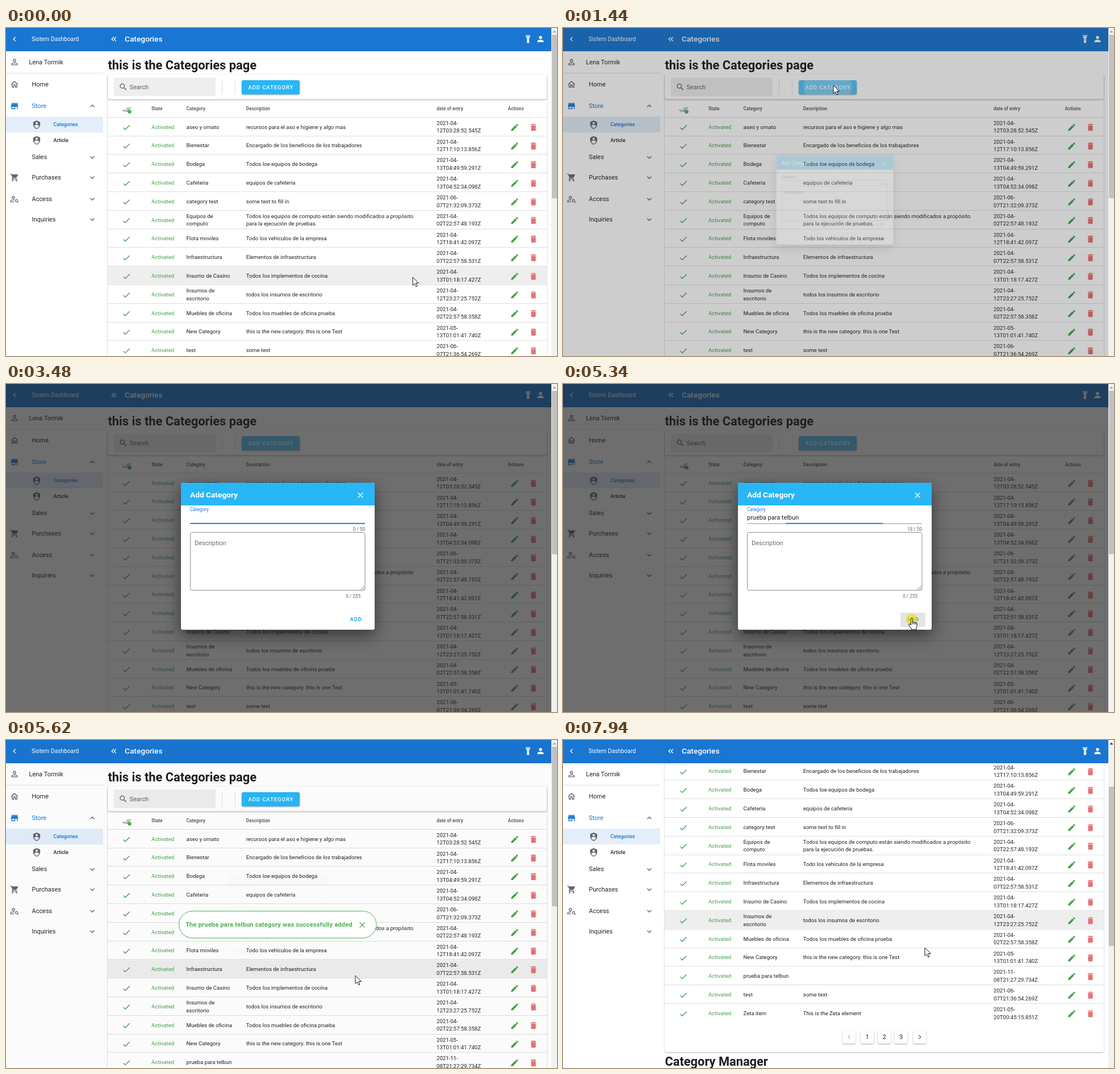
Recreate the animation shown at these times as an HTML page. Size 970 by 578 pixels, loop 8 s.

```html
<!DOCTYPE html>
<html lang="en">
<head>
<meta charset="utf-8">
<title>Categories</title>
<style>
html, body { margin: 0; width: 100%; height: 100%; overflow: hidden; background: #fff; }
svg { display: block; width: 970px; height: 578px; font-family: Roboto, sans-serif; }
text { white-space: pre; }
path { fill-rule: evenodd; }
.card { filter: drop-shadow(0 1px 1px rgba(0,0,0,.3)); }
.bar { filter: drop-shadow(0 1px 1px rgba(0,0,0,.35)); }
.panel { filter: drop-shadow(0 10px 14px rgba(0,0,0,.5)); }
.chip { filter: drop-shadow(0 1px 1px rgba(0,0,0,.35)); }
#modal { transform-origin: 478.5px 303.5px; }
#toast { transform-origin: 478px 325px; }
#line { transform-origin: 478px 246px; }
#ripple { transform-origin: 466px 104px; }
</style>
</head>
<body>
<svg id="stage" viewBox="0 0 970 578"></svg>
<script>
const LOOP = 8000, PITCH = 32.8, TOP = 157.8;
const BLUE = '#1976d2', SKY = '#29b6f6', GREEN = '#43a047', DARK = 'rgba(0,0,0,.87)', GREY = 'rgba(0,0,0,.6)';
const ENTRY = 'prueba para telbun';

const ICONS = {
  left: 'M15.4 16.6 10.8 12l4.6-4.6L14 6l-6 6 6 6Z',
  right: 'M8.6 16.6 13.2 12 8.6 7.4 10 6l6 6-6 6Z',
  down: 'M7.4 8.6 12 13.2l4.6-4.6L18 10l-6 6-6-6Z',
  up: 'M7.4 15.4 12 10.8l4.6 4.6L18 14l-6-6-6 6Z',
  first: 'M18.4 7.4 17 6l-6 6 6 6 1.4-1.4L13.8 12ZM12.4 7.4 11 6l-6 6 6 6 1.4-1.4L7.8 12Z',
  check: 'M21 7 9 19l-5.5-5.5 1.4-1.4L9 16.2 19.6 5.6Z',
  checks: 'M.4 13.4 6 19l1.4-1.4L1.8 12ZM22.2 5.6 11.7 16.2 7.5 12l-1.4 1.4 5.6 5.6 12-12ZM18 7l-1.4-1.4-6.4 6.3 1.5 1.4Z',
  pencil: 'M20.7 7c.4-.4.4-1 0-1.4l-2.3-2.3c-.4-.4-1-.4-1.4 0l-1.9 1.8 3.8 3.8ZM3 17.2V21h3.8L17.8 9.9l-3.7-3.7Z',
  bin: 'M19 4h-3.5l-1-1h-5l-1 1H5v2h14ZM6 19a2 2 0 0 0 2 2h8a2 2 0 0 0 2-2V7H6Z',
  close: 'M19 6.4 17.6 5 12 10.6 6.4 5 5 6.4l5.6 5.6L5 17.6 6.4 19l5.6-5.6 5.6 5.6 1.4-1.4-5.6-5.6Z',
  search: 'M9.5 3a6.5 6.5 0 0 1 4.9 10.7l.3.3h.8l5 5-1.5 1.5-5-5v-.8l-.3-.3A6.5 6.5 0 1 1 9.5 3Zm0 2a4.5 4.5 0 1 0 0 9 4.5 4.5 0 0 0 0-9Z',
  torch: 'M9 10 6 5h12l-3 5ZM18 4H6V2h12ZM9 22V11h6v11Zm3-9a1 1 0 1 0 0 2 1 1 0 0 0 0-2Z',
  person: 'M12 4a4 4 0 1 1 0 8 4 4 0 0 1 0-8Zm0 10c4.4 0 8 1.8 8 4v2H4v-2c0-2.2 3.6-4 8-4Z',
  user: 'M12 4a4 4 0 1 1 0 8 4 4 0 0 1 0-8Zm0 2a2 2 0 1 0 0 4 2 2 0 0 0 0-4Zm0 7c2.7 0 8 1.3 8 4v3H4v-3c0-2.7 5.3-4 8-4Zm0 1.9c-3 0-6.1 1.5-6.1 2.1v1.1h12.2V17c0-.6-3.1-2.1-6.1-2.1Z',
  home: 'M12 5.7l5 4.5V18h-2v-6H9v6H7v-7.8ZM12 3 2 12h3v8h6v-6h2v6h6v-8h3Z',
  store: 'M12 18H6v-4h6Zm9-4v-2l-1-5H4l-1 5v2h1v6h10v-6h4v6h2v-6ZM20 4H4v2h16Z',
  shield: 'M12 1 3 5v6c0 5.6 3.8 10.7 9 12 5.2-1.3 9-6.4 9-12V5Zm0 4a3 3 0 1 1 0 6 3 3 0 0 1 0-6Zm5.1 12a9.6 9.6 0 0 1-5.1 3.9A9.6 9.6 0 0 1 6 15.5c0-1.7 2.7-3 6-3s6 1.3 6 3Z',
  cart: 'M17 18a2 2 0 1 1 0 4 2 2 0 0 1 0-4ZM1 2h3.3l.9 2H20a1 1 0 0 1 .9 1.5L17.3 12a2 2 0 0 1-1.8 1H8.1l-.9 1.6.2.4H19v2H7a2 2 0 0 1-1.8-3l1.4-2.4L3 4H1ZM7 18a2 2 0 1 1 0 4 2 2 0 0 1 0-4Z',
  lookup: 'M9 4a4 4 0 1 1 0 8 4 4 0 0 1 0-8Zm0 2a2 2 0 1 0 0 4 2 2 0 0 0 0-4ZM9 13c-2.7 0-8 1.3-8 4v3h10v-1.9H2.9V17c0-.6 3.1-2.1 6.1-2.1h1.5L11.5 13ZM17 12a4 4 0 0 1 3.4 6.1l3 3-1.3 1.3-3-3A4 4 0 1 1 17 12Zm0 1.8a2.2 2.2 0 1 0 0 4.4 2.2 2.2 0 0 0 0-4.4Z'
};

const text = (x, cy, s, size = 9.6, fill = DARK, extra = '') =>
  `<text x="${x}" y="${cy + size * .36}" font-size="${size}" fill="${fill}" ${extra}>${s}</text>`;
const rect = (x, y, w, h, fill, extra = '') =>
  `<rect x="${x}" y="${y}" width="${w}" height="${h}" fill="${fill}" ${extra}/>`;
const icon = (name, cx, cy, fill = GREY, size = 16.4) =>
  `<path transform="translate(${cx - size / 2} ${cy - size / 2}) scale(${size / 24})" d="${ICONS[name]}" fill="${fill}"/>`;
const group = (id, body) => `<g id="${id}">${body}</g>`;
const BOLD = 'font-weight="700"', MEDIUM = 'font-weight="500"';
const CAPS = MEDIUM + ' letter-spacing=".86"';
const RIGHT = 'text-anchor="end"', MIDDLE = 'text-anchor="middle"';

// Category, description, date of entry; "|" breaks a line.
const ROWS = [
  ['aseo y ornato', 'recursos para el aso e higiene y algo mas', '2021-04-|12T03:28:52.545Z'],
  ['Bienestar', 'Encargado de los beneficios de los trabajadores', '2021-04-|12T17:10:13.856Z'],
  ['Bodega', 'Todos loe equipos de bodega', '2021-04-|13T04:49:59.291Z'],
  ['Cafeteria', 'equipos de cafeteria', '2021-04-|13T04:52:34.098Z'],
  ['category test', 'some text to fill in', '2021-06-|07T21:32:09.373Z'],
  ['Equipos de|computo', 'Todos los equipos de computo están siendo modificados a propósito|para la ejecución de pruebas.', '2021-04-|02T22:57:48.193Z'],
  ['Flota moviles', 'Todo los vehículos de la empresa', '2021-04-|12T18:41:42.097Z'],
  ['Infraestructura', 'Elementos de infraestructura', '2021-04-|07T22:57:58.531Z'],
  ['Insumo de Casino', 'Todos los implementos de cocina', '2021-04-|13T01:18:17.427Z'],
  ['Insumos de|escritorio', 'todos los insumos de escritorio', '2021-04-|12T23:27:25.752Z'],
  ['Muebles de oficina', 'Todos los muebles de oficina prueba', '2021-04-|02T22:57:58.358Z'],
  ['New Category', 'this is the new category. this is one Test', '2021-05-|13T01:01:41.740Z'],
  [ENTRY, '', '2021-11-|08T21:27:29.734Z'],
  ['test', 'some text', '2021-06-|07T21:36:54.269Z'],
  ['Zeta item', 'This is the Zeta element', '2021-05-|20T00:45:15.851Z']
];
const cell = (x, cy, s) => {
  const lines = s.split('|');
  return lines.map((l, i) => text(x, cy + (i - (lines.length - 1) / 2) * 13.6, l)).join('');
};
const row = (cells, i) => {
  const cy = TOP + PITCH * (i + .5);
  return icon('check', 212, cy + 1, GREEN) + text(256, cy, 'Activated', 9.6, GREEN)
    + cells.map((s, c) => cell([317.5, 422.7, 758][c], cy, s)).join('')
    + icon('pencil', 895.5, cy + 1, GREEN) + icon('bin', 928.5, cy + 1, '#e57373')
    + (i < ROWS.length - 1 ? rect(179, Math.round(TOP + PITCH * (i + 1)) - 1, 773, 1, '#dedede') : '');
};

const chip = (x, label) => rect(x, 664, 23, 23, '#fff', 'rx="3" class="chip"') + label;
const pager = chip(492, icon('left', 503.5, 675.5, '#bbb')) + chip(524, text(535.5, 675.5, 1, 11, DARK, MIDDLE))
  + chip(554, text(565.5, 675.5, 2, 11, DARK, MIDDLE)) + chip(583.5, text(595, 675.5, 3, 11, DARK, MIDDLE))
  + chip(616.5, icon('right', 628, 675.5));

const heads = [[256, 'State'], [317.5, 'Category'], [422.7, 'Description'], [758, 'date of entry'], [883.5, 'Actions']];
const page = text(179.5, 65.5, 'this is the Categories page', 21.8, '#1d1d1d', BOLD)
  + rect(179, 82, 773, 620, '#fff', 'rx="3" class="card"')
  + rect(179, 82, 773, 43.5, '#fff', 'rx="3" class="bar"')
  + rect(190, 87.5, 179, 32.5, '#eee', 'rx="3"') + icon('search', 206.5, 104)
  + text(217.5, 104, 'Search', 10.96, GREY)
  + rect(380, 91, 1, 26, '#dedede') + rect(403, 91, 1, 26, '#dedede')
  + rect(415, 92, 102, 25, SKY, 'rx="3" class="chip"')
  + rect(415, 92, 102, 25, '#fff', 'id="focus" rx="3" opacity="0"')
  + '<g clip-path="url(#button)"><circle id="ripple" cx="466" cy="104" r="52" fill="#fff" opacity="0"/></g>'
  + text(426.5, 104.5, 'ADD CATEGORY', 9.6, '#fff', CAPS)
  + icon('checks', 212.5, 143.5, '#7d917d') + '<circle cx="217.5" cy="147.5" r="3.3" fill="#4caf50"/>'
  + heads.map(([x, s]) => text(x, 142, s, 8.2, GREY, BOLD)).join('')
  + rect(179, 157, 773, 1, '#dedede')
  + rect(179, TOP, 773, PITCH - 1, '#eee', 'id="hover"')
  + ROWS.slice(0, 12).map(row).join('')
  + group('fresh', row(ROWS[12], 12))
  + group('tail', row(ROWS[13], 13) + row(ROWS[14], 14) + pager)
  + text(179.5, 718, 'Category Manager', 21.8, '#1d1d1d', BOLD);

const menu = [['Home', 99, 'home'], ['Store', 137, 'store', 'up'], ['Sales', 227.5, '', 'down'],
  ['Purchases', 263, 'cart', 'down'], ['Access', 301, 'lookup', 'down'], ['Inquiries', 337, '', 'down']];
const sidebar = rect(0, 41, 171, 537, '#fff') + icon('user', 15, 60) + text(40.5, 60, 'Lena Tormik', 10.96)
  + rect(0, 79, 171, 1, '#dedede') + rect(0, 156, 171, 28, '#e3eefa')
  + menu.map(([s, y, sign, arrow]) => {
    const tint = s === 'Store' ? BLUE : undefined;
    return text(45.5, y, s, 10.96, tint) + (sign ? icon(sign, 15, y + .5, tint) : '')
      + (arrow ? icon(arrow, 152, y + .5) : '');
  }).join('')
  + icon('shield', 54, 170.5, '#666') + text(83.5, 170, 'Categories', 8.9, BLUE, MEDIUM)
  + icon('shield', 54, 198, '#666') + text(83.5, 197.5, 'Article', 8.9, DARK, MEDIUM);

const toolbar = rect(0, 0, 960, 41, BLUE) + icon('left', 15, 19.5, '#fff')
  + text(45, 19.5, 'Sistem Dashboard', 10.2, '#fff') + icon('first', 190, 19.5, '#fff')
  + text(209, 19.5, 'Categories', 13.7, '#fff', MEDIUM)
  + icon('torch', 919, 19.5, '#fff') + icon('person', 941, 19.5, '#fff');

const steps = [...Array(ENTRY.length + 1).keys()];
const modal = rect(308, 174, 341, 259, '#fff', 'rx="3" class="panel"')
  + `<path d="M308 214V177a3 3 0 0 1 3-3H646a3 3 0 0 1 3 3V214Z" fill="${SKY}"/>`
  + text(324, 195.5, 'Add Category', 13.7, '#fff', BOLD) + icon('close', 624, 196, '#fff')
  + group('label', text(0, -3.95, 'Category', 10.96, 'inherit'))
  + rect(324, 245.5, 308, 1, '#8c8c8c') + rect(324, 244.8, 308, 1.7, BLUE, 'id="line"')
  + steps.map(k => group('typed' + k, text(324, 235, ENTRY.slice(0, k), 10.96)
    + text(632, 256.5, k + ' / 50', 8.2, GREY, RIGHT))).join('')
  + rect(0, 228, 1, 14, '#000', 'id="caret"')
  + rect(324.5, 261.5, 307.5, 102, 'none', 'rx="3" stroke="#8c8c8c"')
  + '<path d="M624 362.5l7-7M628 362.5l3-3" stroke="#555" stroke-width=".9"/>'
  + text(332, 280.5, 'Description', 10.96, GREY) + text(624, 374, '0 / 255', 8.2, GREY, RIGHT)
  + rect(594, 403, 44, 25, '#e4e4e4', 'id="pressed" rx="3"') + text(605.5, 415, 'ADD', 9.6, '#039be5', CAPS);

const toast = rect(304.5, 301.5, 347.5, 47.5, '#fff', 'rx="23.7" stroke="#4caf50"')
  + text(316, 325, `The ${ENTRY} category was successfully added`, 10.96, '#4caf50', BOLD + ' letter-spacing=".26"')
  + icon('close', 627, 326, '#4caf50');

const cursor = '<circle id="click" cy="2" r="10" fill="#f0e000" opacity="0"/>'
  + '<path id="arrow" d="M0 0V14.5L3.4 11.4 5.8 16.8 8 15.8 5.7 10.5H10.4Z" fill="#fff" stroke="#000" stroke-width=".9"/>'
  + '<path id="hand" d="M-1.4 11V1.2a1.4 1.4 0 0 1 2.8 0V6.8q1.3-1 2.7.3 1.4-.8 2.6.5 2-.4 2.3 1.5v4.4q-.2 2.5-1.5 4.2v2.3H-.3v-1.7L-4.6 12.8q-1.6-2.3.2-2.9 1-.3 3 2ZM1.4 7v3.5M4.1 7.3v3.2M6.7 7.8v2.7" fill="#fff" stroke="#000"/>'
  + '<path id="beam" d="M-3-6.5h2.2L0-6l.8-.5H3M0-6V6M-3 6.5h2.2L0 6l.8.5H3" fill="none" stroke="#222"/>';

document.getElementById('stage').innerHTML =
  '<clipPath id="button"><rect x="415" y="92" width="102" height="25" rx="3"/></clipPath>'
  + rect(0, 0, 970, 578, '#fff') + group('scroll', page) + sidebar + toolbar
  + rect(0, 0, 960, 578, '#212121', 'id="shade"') + group('modal', modal) + group('toast', toast)
  + rect(960, 0, 10, 578, '#f1f1f1') + '<path id="nub" d="M962.5 8 965.5 4.5 968.5 8Z"/>'
  + rect(961, 12, 9, 288, '#c1c1c1', 'id="thumb"') + group('cursor', cursor);

const $ = id => document.getElementById(id);
const HOLD = 'step-end', SWIFT = 'cubic-bezier(.25,.8,.5,1)';

// Keys are [time, value, easing towards the next key].
function track(id, prop, keys, easing = 'linear') {
  const frames = keys.map(([t, v, e = easing]) => ({ offset: t / LOOP, [prop]: v, easing: e }));
  if (frames[0].offset > 0) frames.unshift({ ...frames[0], offset: 0, easing: HOLD });
  if (frames.at(-1).offset < 1) frames.push({ ...frames.at(-1), offset: 1 });
  $(id).animate(frames, { duration: LOOP, iterations: Infinity });
}
const show = (id, ...times) =>
  track(id, 'opacity', [[0, 0], ...times.map((t, i) => [t, i % 2 ? 0 : 1])], HOLD);
const at = (x, y) => `translate(${x}px,${y}px)`;

// Pointer
track('cursor', 'transform', [
  [0, 716, 439], [80, 716, 439], [150, 703, 421], [480, 703, 421], [1240, 476, 101], [1870, 476, 101],
  [2060, 470, 150], [2400, 404, 240], [2540, 404, 244], [4450, 404, 244], [4590, 540, 430], [5010, 616, 434],
  [5339, 616, 434], [5340, 614, 413], [5480, 614, 413], [5550, 615, 415], [6080, 615, 415], [6780, 628, 327],
  [7260, 628, 327], [7470, 637, 366]
].map(([t, x, y]) => [t, at(x, y)]));
show('arrow', 0, 2380, 4450, 5340, 5500, 6700, 7380);
show('beam', 2380, 3480);
show('hand', 5340, 5500, 6700, 7380);
show('click');
track('click', 'opacity', [[0, 0], [1290, .65], [1400, 0], [2540, .65], [2650, 0], [5340, .65], [5450, 0], [7050, .65], [7150, 0]], HOLD);

// Row under the pointer
const climb = [...Array(8).keys()].map(k => [482 + 78 * k, 7 - k]);
track('hover', 'transform', [[0, 8], ...climb, [1106, -40], [5480, 7], [6300, 6], [6600, -40], [7250, 5], [7410, 6], [7800, 9]]
  .map(([t, i]) => [t, at(0, i * PITCH)]), HOLD);

// Button and dialog
track('focus', 'opacity', [[1240, 0], [1290, .2], [5400, .2], [5600, 0]]);
track('ripple', 'opacity', [[1290, 0], [1300, .22], [1500, .22], [1750, 0]]);
track('ripple', 'transform', [[1290, 'scale(.1)'], [1480, 'scale(1)']]);
track('shade', 'opacity', [[1404, 0, SWIFT], [1704, .65], [5400, .65, SWIFT], [5700, 0]]);
track('modal', 'opacity', [[1420, 0, SWIFT], [1720, 1], [5400, 1, SWIFT], [5700, 0]]);
track('modal', 'transform', [[1420, 'scale(.5)', SWIFT], [1720, 'scale(1)'], [5400, 'scale(1)', SWIFT], [5700, 'scale(.5)']]);

// Text field
const low = at(324, 239) + ' scale(1)', high = at(324, 224) + ' scale(.75)';
track('label', 'transform', [[2540, low, SWIFT], [2840, high]]);
track('label', 'fill', [[0, '#666'], [2540, BLUE], [5410, '#666']], HOLD);
track('line', 'transform', [[2540, 'scaleX(0)', SWIFT], [2840, 'scaleX(1)'], [5339, 'scaleX(1)'], [5340, 'scaleX(.56)'], [5500, 'scaleX(0)']]);
const typeTime = k => 3820 + 35 * (k - 1);
steps.forEach(k => show('typed' + k, k ? typeTime(k) : 0, k < ENTRY.length ? typeTime(k + 1) : LOOP));
const full = $('typed' + ENTRY.length).firstChild;
track('caret', 'transform', steps.map(k => [k ? typeTime(k) : 0, at(324 + (k ? full.getSubStringLength(0, k) : 0), 0)]), HOLD);
show('caret', 2680, 3280, 3810, 4940);
show('pressed', 5340);

// New row, message, scrolling
show('fresh', 5480);
track('tail', 'transform', [[0, at(0, -PITCH)], [5480, at(0, 0)]], HOLD);
track('thumb', 'height', [[0, '288px'], [5480, '281px']], HOLD);
track('toast', 'opacity', [[5460, 0], [5600, 1], [7120, 1], [7240, 0]]);
track('toast', 'transform', [[5460, 'scale(.8)', SWIFT], [5610, 'scale(1)']]);
track('scroll', 'transform', [[7500, at(0, 0), 'ease-in-out'], [7940, at(0, -152)]]);
track('thumb', 'transform', [[7500, at(0, 0), 'ease-in-out'], [7940, at(0, 70)]]);
track('nub', 'fill', [[0, '#a3a3a3'], [7500, '#333']], HOLD);
</script>
</body>
</html>
```
